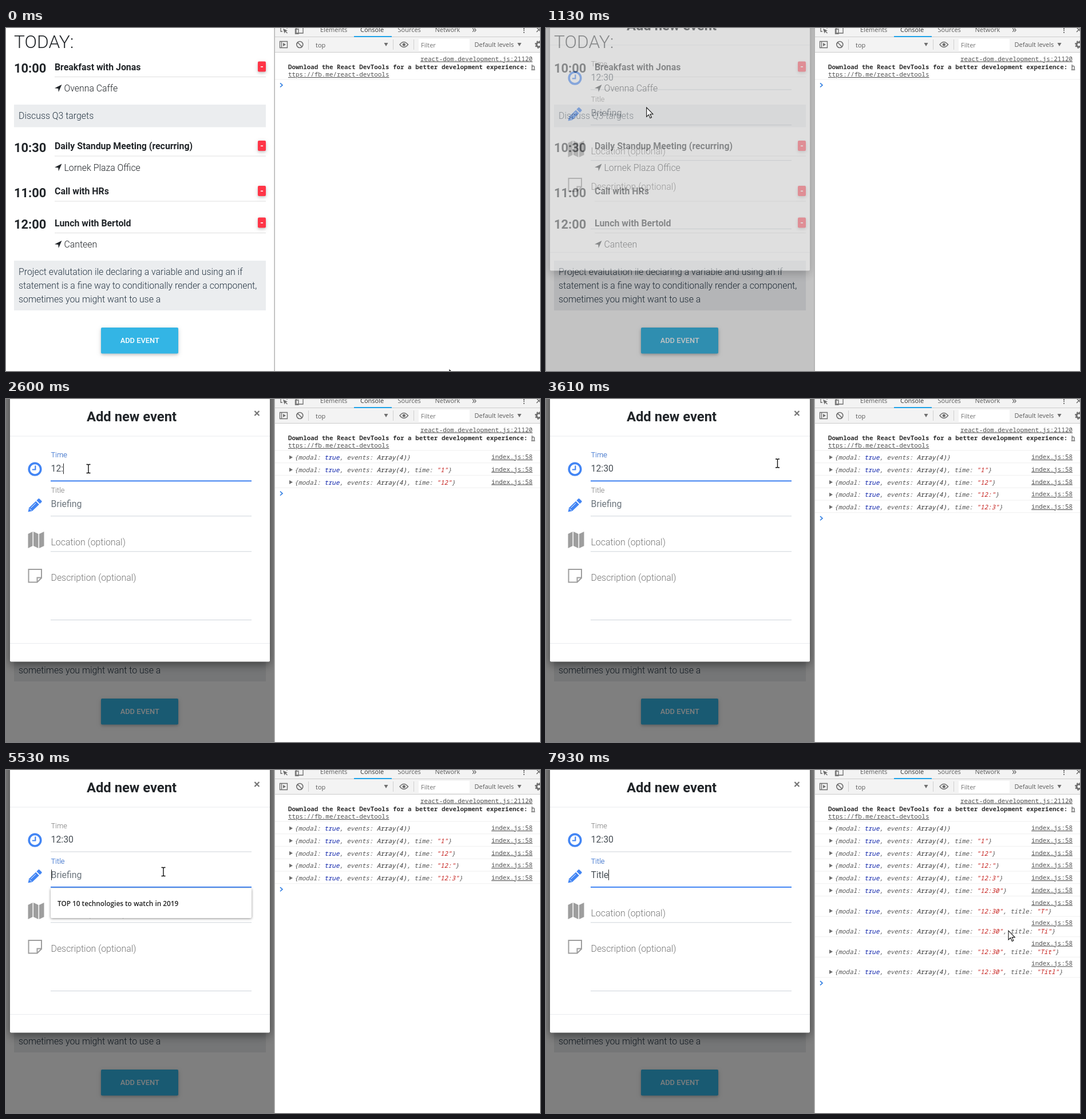
An HTML page for the animation above (8 s loop, 933 by 600 pixels).

```html
<!DOCTYPE html>
<html lang="en">
<head>
<meta charset="utf-8">
<title>Event planner</title>
<style>
html, body { margin: 0; width: 100%; height: 100%; overflow: hidden; background: #fff; }
svg { display: block; }
text { font: 400 15.87px Roboto, sans-serif; fill: #212529; white-space: pre; }
.light { font-weight: 300; }
.bold { font-weight: 700; }
.note { font-weight: 300; fill: #263644; }
.label { font-weight: 300; fill: #757575; }
.hint { fill: #6c757d; }
.value { fill: #495057; }
.ui { font: 400 11px "Open Sans", sans-serif; fill: #5a5a5a; }
.mono { font: 400 10.9px "Noto Sans Mono", monospace; fill: #303030; }
.obj { font-style: italic; fill: #565656; }
.link { text-decoration: underline; fill: #545454; }
.end { text-anchor: end; }
.mid { text-anchor: middle; }
.raised { filter: drop-shadow(0 2px 2px rgba(0,0,0,.16)) drop-shadow(0 2px 4px rgba(0,0,0,.12)); }
.panel { filter: drop-shadow(0 5px 8px rgba(0,0,0,.45)); }
.popup { filter: drop-shadow(0 1px 2px rgba(0,0,0,.45)); }
</style>
</head>
<body>
<svg id="stage" width="933" height="600" viewBox="0 0 933 600"></svg>
<script>
const LOOP = 8000, BLUE = '#4285f4', GREY = '#6e6e6e';

const text = (x, y, s, cls = '', style = '') =>
  `<text x="${x}" y="${y}" class="${cls}" style="${style}">${s}</text>`;
const rect = (x, y, w, h, fill, more = '') =>
  `<rect x="${x}" y="${y}" width="${w}" height="${h}" fill="${fill}" ${more}/>`;
const path = (d, fill = 'none', stroke = 'none', width = 1) =>
  `<path d="${d}" fill="${fill}" stroke="${stroke}" stroke-width="${width}"/>`;
const ramp = (t, a, b) => Math.min(1, Math.max(0, (t - a) / (b - a)));

// ---- agenda ----
function eventItem(y, time, title, place) {
  return text(14, y + 10.4, time, 'bold', 'font-size:21.9px') +
    text(85, y + 5.5, title, 'bold') +
    rect(85, y + 17, 369, 1, '#dfdfdf') +
    rect(440, y - 9.5, 14, 18, '#ff3547', 'rx="2" class="raised"') +
    rect(445, y - 1, 4, 1.6, '#fff') +
    (place ? path(`M97.5 ${y + 31}L91.8 ${y + 44}L91.3 ${y + 38}L85 ${y + 37.3}Z`, '#212529') +
      text(101.5, y + 43, place, 'light') : '');
}

const agenda =
  text(14, 35, 'TODAY:', 'light', 'font-size:31.7px') +
  eventItem(68, '10:00', 'Breakfast with Jonas', 'Ovenna Caffe') +
  rect(14, 134, 440, 39.5, '#ebedef') + text(22, 158.5, 'Discuss Q3 targets', 'note') +
  eventItem(206.5, '10:30', 'Daily Standup Meeting (recurring)', 'Lornek Plaza Office') +
  eventItem(285.5, '11:00', 'Call with HRs') +
  eventItem(341, '12:00', 'Lunch with Bertold', 'Canteen') +
  rect(14, 407, 440, 87, '#ebedef') +
  ['Project evalutation ile declaring a variable and using an if',
   'statement is a fine way to conditionally render a component,',
   'sometimes you might want to use a']
    .map((s, i) => text(22, 431.7 + i * 23.9, s, 'note')).join('');

const button =
  '<clipPath id="btnClip"><rect x="166" y="524" width="135" height="45.5" rx="2"/></clipPath>' +
  '<g id="glow">' + rect(166, 524, 135, 45.5, '#33b5e5', 'rx="2"') + '</g>' +
  '<g clip-path="url(#btnClip)"><circle id="ripple" cx="260" cy="546" fill="#fff"/></g>' +
  text(233.7, 550.7, 'ADD EVENT', 'mid', 'font-size:12.85px;font-weight:500;fill:#fff');

// ---- dialog ----
const rule = y => rect(78, y, 351, 1, '#ced4da');
const dialog =
  rect(7, -60, 454, 519.5, '#fff', 'rx="2" class="panel"') +
  text(219.5, 39, 'Add new event', 'bold mid', 'font-size:23.8px') +
  path('M434.4 21l8 8m0-8l-8 8', 'none', '#777', 2.4) +
  rect(7, 64.5, 454, 1, '#e9ecef') + rect(7, 427, 454, 1, '#e9ecef') +
  `<circle cx="50.5" cy="122.7" r="10.3" fill="none" stroke="${BLUE}" stroke-width="3.6"/>` +
  path('M51.3 116.5v7h-5.5', 'none', BLUE, 2.2) +
  path('M38.5 197.5l1.7-7.2l12-11.6l5.7 5.7l-12 11.7Z', BLUE) +
  path('M53.4 177.4l3-3q1-.9 2 0l3.8 3.8q.9 1 0 2l-3 3Z', BLUE) +
  path('M41 191.5l3.8 3.8M43.5 190.5l8.5-8.3', 'none', '#fff', 1) +
  path('M38.5 236l8-4v25l-8 4ZM48 232l8.5 4v25l-8.5-4ZM58 236l8.5-4v25l-8.5 4Z', '#9e9e9e') +
  path('M39.5 298h22.5v15l-7.5 7.5h-15ZM54.5 320v-7.5h7.5', 'none', '#9e9e9e', 2) +
  rule(142.5) + rule(204.3) + rule(266.3) + rule(386) +
  text(78.5, 256, 'Location (optional)', 'label') +
  text(78.5, 317.7, 'Description (optional)', 'label') +
  '<g id="fields"></g>';

// ---- developer console ----
const down = (x, y) => path(`M${x} ${y}h7l-3.5 6Z`, GREY);
const icon = (d, width = 1.3) => path(d, 'none', GREY, width);
const consoleFrame =
  rect(469, 0, 464, 600, '#fff') + rect(470, 0, 463, 42, '#f3f3f3') +
  rect(470, 15, 463, 1, '#ccc') + rect(470, 42, 463, 1, '#ccc') +
  rect(468.5, 0, 1.3, 600, '#a6a6a6') + rect(608, 14, 66, 2, '#1fa2e8') +
  text(549, 7, 'Elements', 'ui') + text(619, 7, 'Console', 'ui', 'fill:#333') +
  text(684.5, 7, 'Sources', 'ui') + text(749.5, 7, 'Network', 'ui') +
  text(814, 7.5, '»', 'ui', 'font-size:17px') +
  icon('M480 0v6h3M491 0v1') + path('M484 1l8 3.5l-3 1l3 3l-1 1l-3-3l-1.5 3Z', GREY) +
  icon('M507 0v9h12v-9M505.5 2h5.5v8h-5.5Z') +
  [0, 2.8, 6.7].map(y => rect(904, y, 2, 2, GREY)).join('') +
  icon('M927 -1l8 8m0-8l-8 8', 1.5) +
  icon('M478.5 23.5h13v11h-13ZM481.5 24v10') + path('M484 26l5 3l-5 3Z', GREY) +
  icon('M507.8 29a5.5 5.5 0 1 0 11 0a5.5 5.5 0 1 0-11 0M509.5 25.2l7.5 7.6', 1.6) +
  [528, 676, 712].map(x => rect(x, 20, 1, 18, '#d0d0d0')).join('') +
  text(541, 33.5, 'top', 'ui') + down(660.5, 26) +
  icon('M688 29q7-9 14.5 0q-7.5 9-14.5 0Z', 1.5) +
  `<circle cx="695.3" cy="29" r="2.6" fill="${GREY}"/>` +
  rect(721, 19, 89, 21, '#fff') + text(725, 34, 'Filter', 'ui', 'fill:#757575') +
  text(818.5, 33, 'Default levels', 'ui') + down(893.5, 26) +
  `<circle cx="931" cy="29" r="4" fill="none" stroke="${GREY}" stroke-width="3"/>` +
  `<circle cx="931" cy="29" r="6" fill="none" stroke="${GREY}" stroke-width="2" stroke-dasharray="2.36"/>` +
  text(920, 57.5, 'react-dom.development.js:21120', 'mono link end') +
  text(493, 71.5, 'Download the React DevTools for a better development experience: ' +
    '<tspan text-decoration="underline" font-weight="400">h</tspan>', 'mono', 'font-weight:700') +
  text(493, 85, 'ttps://fb.me/react-devtools', 'mono link') +
  rect(470, 89.5, 463, 1, '#f0f0f0') + '<g id="log"></g>';

const stage = document.getElementById('stage');
stage.innerHTML = agenda + button +
  '<rect id="shade" width="469" height="600"/><g id="dialog">' + dialog + '</g>' +
  consoleFrame + '<g id="cursor"></g>';
const part = Object.fromEntries([...stage.querySelectorAll('[id]')].map(e => [e.id, e]));

// ---- typing ----
const timeKeys = [2220, 2290, 2600, 2680, 2830], titleKeys = [6150, 6300, 6380, 6450, 6530];
const keys = [...timeKeys, ...titleKeys];
const typed = (word, times, t) => word.slice(0, times.filter(k => k <= t).length);
const timeAt = t => typed('12:30', timeKeys, t);
const titleAt = t => typed('Title', titleKeys, t);

const pen = document.createElement('canvas').getContext('2d');
pen.font = '400 15.87px Roboto, sans-serif';

function field(y, name, value, hint, focus, caret) {
  const x = 78.5 + pen.measureText(value).width;
  return text(78.5, y - 19.5, name, 'label', 'font-size:12.7px') +
    text(78.5, y - 19.5, name, 'label', `font-size:12.7px;fill:${BLUE};opacity:${focus}`) +
    text(78.5, y + 5.5, value || hint, value ? 'value' : 'hint') +
    rect(78, y + 20.7, 351, 2, BLUE, `opacity="${focus}"`) +
    (caret ? rect(Math.round(x), y - 9, 1, 18.5, '#222') : '');
}

const popup = (y, s) => rect(78, y, 351, 52, '#fff', 'rx="2" class="popup"') +
  text(90, y + 31, s, 'ui', 'font-size:11.8px;font-weight:600;fill:#222');

function fields(t) {
  const last = Math.max(0, ...[1740, 5150, 5420, ...keys].filter(k => k <= t));
  const lit = last > 0 && (t - last) % 1000 < 500;
  const onTitle = ramp(t, 5150, 5300), onTime = ramp(t, 1740, 1840) * (1 - onTitle);
  return field(121.7, 'Time', timeAt(t), '12:30', onTime, lit && t < 5150) +
    field(183.2, 'Title', titleAt(t), 'Briefing', onTitle, lit && t >= 5150) +
    (t >= 2220 && t < 2290 ? popup(145, '11:30') : '') +
    (t >= 5450 && t < 6300 ? popup(207, 'TOP 10 technologies to watch in 2019') : '');
}

// Every key press logs the state as it was just before.
function log(t) {
  let y = 90, out = '';
  const str = s => `<tspan fill="#c41a16">"${s}"</tspan>`;
  for (const k of keys.filter(k => k <= t)) {
    const time = timeAt(k - 1), title = titleAt(k - 1);
    const base = y + (title ? 30 : 16);
    out += text(920, y + 15, 'index.js:58', 'mono link end') +
      path(`M495 ${base - 7.5}l6 3.5l-6 3.5Z`, GREY) +
      text(504, base, '{modal: <tspan fill="#0d22aa">true</tspan>, events: <tspan fill="#303030">Array(4)</tspan>' +
        (time && ', time: ' + str(time)) + (title && ', title: ' + str(title)) + '}', 'mono obj');
    y += title ? 35.6 : 21.75;
    out += rect(470, y - .5, 463, 1, '#f0f0f0');
  }
  return out + path(`M479 ${y + 6.3}l4 3.6l-4 3.6`, 'none', '#2f7de1', 1.6);
}

// ---- pointer: time, x, y ----
const route = [
  [70, 775, 598], [300, 560, 585], [560, 265, 548], [680, 250, 538], [820, 177, 258],
  [980, 177, 168], [1210, 175, 124], [1400, 168, 121], [1670, 144, 122],
  [3460, 144, 122], [3620, 420, 112], [3720, 700, 93], [3850, 922, 130], [4000, 880, 203],
  [4230, 803, 176], [4380, 803, 172], [4600, 700, 192], [4900, 330, 186], [5070, 275, 178],
  [7080, 275, 178], [7300, 500, 182], [7550, 835, 205], [7680, 845, 235], [7850, 807, 258], [7930, 808, 281]
];

function pointer(t) {
  const next = route.findIndex(p => p[0] > t);
  const b = route.at(next), a = route[next - 1] || b;
  const f = ramp(t, a[0], b[0]);
  return [1, 2].map(n => a[n] + (b[n] - a[n]) * f);
}

const arrow = path('M0 0V16l3.7-3.5l2.6 6l2.5-1.1l-2.6-5.8h5Z', '#fff', '#111', 1.1);
const beam = path('M-3.5-7.5h2.5l1 1l1-1h2.5M0-6.5V6.5M-3.5 7.5h2.5l1-1l1 1h2.5', 'none', '#111', 1.4);
const hand = path('M-1 0q2-2 3 0v6l7 2q2 1 1 5l-2 5h-7l-6-8q0-2 2-1l2 2Z', '#fff', '#111', 1.1);

function draw(t) {
  const hover = ramp(t, 520, 640) * (1 - ramp(t, 1000, 1200));
  part.glow.style.filter =
    `drop-shadow(0 ${2 + 2 * hover}px ${2 + 2 * hover}px rgba(0,0,0,${.16 + .12 * hover})) ` +
    'drop-shadow(0 2px 4px rgba(0,0,0,.12))';
  part.ripple.setAttribute('r', 110 * (1 - (1 - ramp(t, 660, 1300)) ** 2));
  part.ripple.setAttribute('opacity', .15 * (1 - ramp(t, 1000, 1200)));

  const show = ramp(t, 1060, 1210), slide = (1 - ramp(t, 1080, 1395)) ** 2;
  part.shade.setAttribute('opacity', .5 * show);
  part.dialog.setAttribute('opacity', show);
  part.dialog.setAttribute('transform', `translate(0 ${-50 * slide})`);
  part.fields.innerHTML = fields(t);
  part.log.innerHTML = log(t);

  const [x, y] = pointer(t);
  const overButton = t < 1000 && x < 301 && y > 524;
  part.cursor.innerHTML = overButton ? hand : t > 1280 && x < 429 ? beam : arrow;
  part.cursor.setAttribute('transform', `translate(${x} ${y})`);
}

const start = performance.now();
function tick() {
  draw((performance.now() - start) % LOOP);
  requestAnimationFrame(tick);
}
tick();
</script>
</body>
</html>
```
